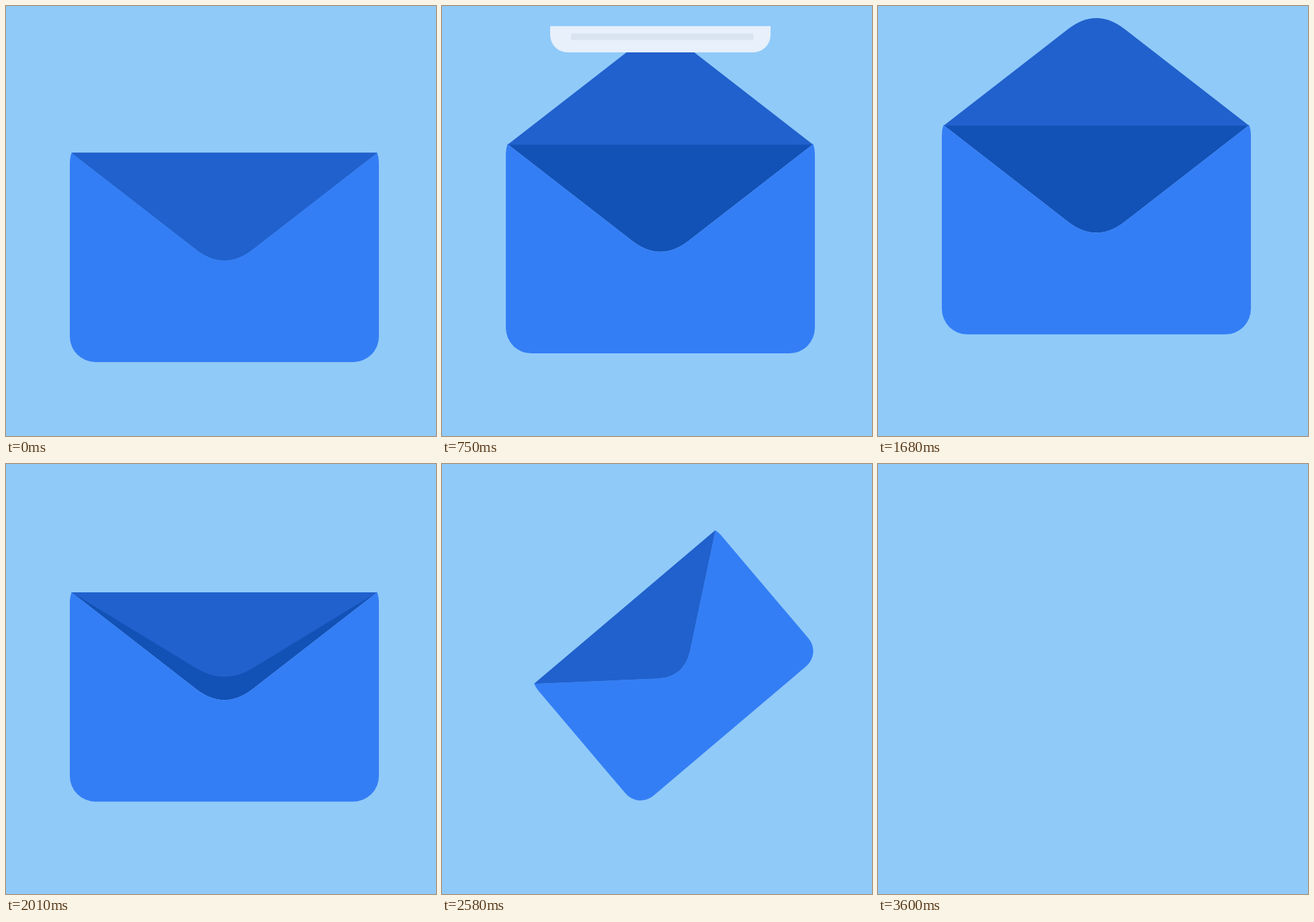
Write an HTML page that moves like this. It is 640 by 640 pixels and loops after 9.03 s.

```html
<!DOCTYPE html>
<html lang="en">
<head>
<meta charset="utf-8">
<title>Envelope sent</title>
<style>
  html, body { margin: 0; width: 100%; height: 100%; overflow: hidden; background: #90caf9; }
  svg { display: block; width: 100vw; height: 100vh; }
</style>
</head>
<body>
<svg viewBox="0 0 640 640">
  <defs>
    <path id="flap" d="M-227.500 0L-42 144Q0 176.500 42 144L227.500 0Z"/>
    <clipPath id="slot"><rect x="90" y="43" width="470" height="457"/></clipPath>
  </defs>
  <g id="spin">
    <g id="bob">
      <use href="#flap" x="325" y="218.500" fill="#1251b6"/>
      <use id="open" href="#flap" fill="#2161cd"/>
      <g clip-path="url(#slot)">
        <g id="paper">
          <rect x="161" width="328" height="231" rx="26" fill="#e7f0fb"/>
          <g id="lines" fill="#dae4f0"></g>
        </g>
      </g>
      <path fill="#347ef5" d="M97.500 218.500L283 362.500Q325 395 367 362.500L552.500 218.500Q555 225 555 233V492A38 38 0 0 1 517 530H133A38 38 0 0 1 95 492V233Q95 225 97.500 218.500Z"/>
      <use id="closed" href="#flap" fill="#2161cd"/>
    </g>
  </g>
  <g id="badge">
    <circle r="170.500" fill="#347ef5"/>
    <path id="tick" d="M-68 0L-22 45.500L68 -45" fill="none" stroke="#fbfcfc" stroke-width="27.500" stroke-linecap="round" stroke-linejoin="round"/>
  </g>
</svg>
<script>
const LOOP = 9030, STEP = 30, END = 120;
const $ = id => document.getElementById(id);
const place = (id, value) => $(id).setAttribute("transform", value);
const show = (id, on) => $(id).setAttribute("visibility", on ? "visible" : "hidden");

// Eased progress from 0 to 1 between two ticks
function ease(tick, from, to) {
  const u = Math.min(1, Math.max(0, (tick - from) / (to - from)));
  return u * u * (3 - 2 * u);
}

for (let i = 0; i < 7; i++) {
  const line = document.createElementNS("http://www.w3.org/2000/svg", "rect");
  const box = { x: 192, y: 27.500 + i * 29.200, width: 271.500, height: 10 };
  for (const key in box) line.setAttribute(key, box[key]);
  $("lines").append(line);
}

function drawEnvelope(k) {
  const lift = -50 * (ease(k, 0, 15) - ease(k, 15, 30) + ease(k, 45, 60) - ease(k, 60, 75));
  place("bob", `translate(0 ${lift})`);

  const fold = k <= 60 ? 1 - 2 * ease(k, 0, 15) : ease(k, 60, 70);
  const id = fold < 0 ? "open" : "closed";
  show("open", id === "open");
  show("closed", id === "closed");
  place(id, `translate(325 ${fold < 0 ? 219.500 : 218.500}) scale(1 ${fold})`);

  show("paper", k >= 15 && k < 60);
  place("paper", `translate(0 ${-242.600 + 741.500 * ease(k, 15, 60)})`);

  const turn = ease(k, 80, 99.600);
  const rise = -46 * ease(k, 82, 86.500) + 30 * ease(k, 87, 102);
  place("spin", `translate(320 ${320 + rise}) rotate(${-180 * turn}) scale(${1 - turn}) translate(-320 -320)`);
}

function drawBadge(k) {
  const left = 1 - ease(k, 87, 102);
  const slide = 1 - ease(k, 88, 107);
  place("badge", `translate(${320.500 + 8.400 * left} ${304.500 - 29.300 * left}) scale(${ease(k, 87, 97.900)})`);
  place("tick", `translate(${15 * slide} ${65 * slide}) scale(1.195)`);
}

function draw(now) {
  const k = Math.floor((now % LOOP) / STEP);
  show("spin", true);
  drawEnvelope(k);
  drawBadge(k);
  $("spin").style.display = k < 96 ? "" : "none";
  $("badge").style.display = k > 87 && k < END ? "" : "none";
}

let start = null;
function loop(now) {
  if (start === null) start = now;
  draw(Math.max(0, now - start));
  requestAnimationFrame(loop);
}
draw(0);
requestAnimationFrame(loop);
</script>
</body>
</html>
```
